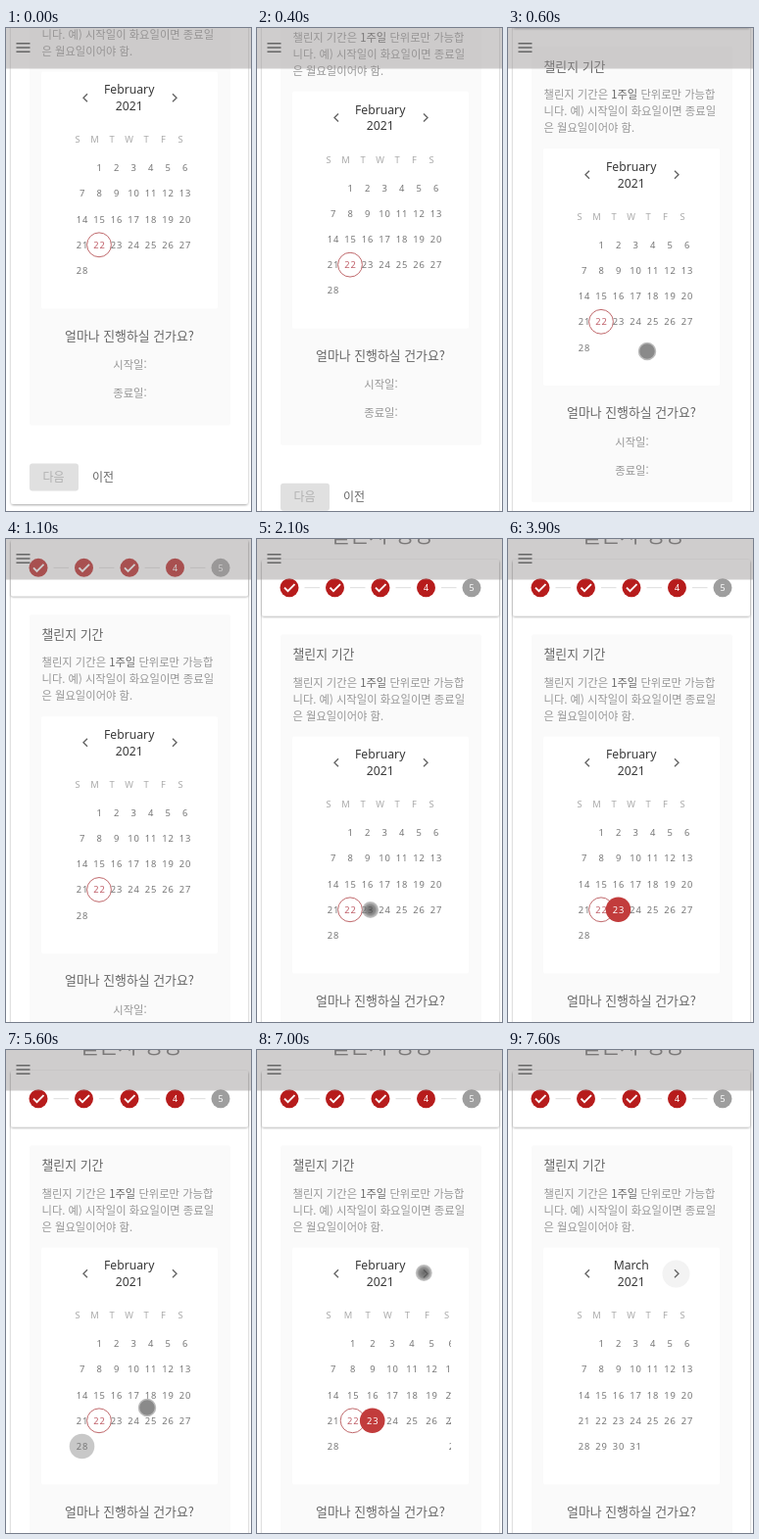
These frames come from a looping animation (250 px wide and 493 px high, 8 s). An HTML page:

```html
<!DOCTYPE html>
<html lang="ko">
<head>
<meta charset="utf-8">
<title>챌린지 기간</title>
<style>
  html, body { margin: 0; width: 100%; height: 100%; overflow: hidden; background: #fff; }
  svg { display: block; width: 100%; height: 100%; }
  text { font-family: "Noto Sans CJK KR", "Noto Sans CJK", "Noto Sans KR", sans-serif; fill: #979797; font-size: 11.3px; }
  .mid { text-anchor: middle; }
  .strong { font-weight: 500; fill: #666; }
  .month text { font: 12.2px "Noto Sans", "Open Sans", sans-serif; fill: #3a3a3a; }
  .day, .week { font: 9.4px "Noto Sans", "Open Sans", sans-serif; letter-spacing: .9px; fill: #777; }
  .week { fill: #aaa; letter-spacing: 0; }
  .step { font: 9px "Noto Sans", sans-serif; fill: #fff; }
  .line { fill: none; stroke: #666; stroke-width: 1.4; }
</style>
</head>
<body>
<svg viewBox="0 0 250 493">
  <defs>
    <filter id="shadow" x="-5%" y="-5%" width="110%" height="112%">
      <feDropShadow dx="0" dy="1" stdDeviation="1" flood-color="#000" flood-opacity=".35"/>
    </filter>
    <radialGradient id="press">
      <stop offset="0" stop-color="#444" stop-opacity=".8"/>
      <stop offset=".6" stop-color="#666" stop-opacity=".75"/>
      <stop offset="1" stop-color="#999" stop-opacity=".5"/>
    </radialGradient>
    <clipPath id="gridClip"><rect x="64" y="262" width="134" height="170"/></clipPath>
    <clipPath id="monthClip"><rect x="90" y="208" width="71" height="40"/></clipPath>
  </defs>

  <g id="page">
    <rect x="5" y="21.5" width="242" height="622" rx="3" fill="#fff" filter="url(#shadow)"/>
    <rect x="5" y="21.5" width="242" height="57.5" rx="2" fill="#fff" filter="url(#shadow)"/>
    <text class="mid strong" x="127" y="3.7" style="font-size:21.5px">챌린지 생성</text>
    <g id="steps"></g>

    <rect x="24" y="98" width="205" height="465" rx="2" fill="#fafafa"/>
    <text class="strong" x="36.5" y="122.5" style="font-size:12.9px">챌린지 기간</text>
    <text x="36.5" y="151.3">챌린지 기간은 <tspan class="strong">1주일</tspan> 단위로만 가능합</text>
    <text x="36.5" y="168.3">니다. 예) 시작일이 화요일이면 종료일</text>
    <text x="36.5" y="185.3">은 월요일이어야 함.</text>

    <rect x="36" y="202" width="180" height="242" rx="2" fill="#fff"/>
    <circle id="hover" cx="171.5" cy="229" r="14" fill="#f3f3f3"/>
    <path class="line" d="M83 224.7l-4 4 4 4M170 224.7l4 4-4 4"/>
    <g class="month" clip-path="url(#monthClip)">
      <g id="label0"><text class="mid" x="125.7" y="224.7">February</text><text class="mid" x="125.7" y="241.5">2021</text></g>
      <g id="label1"><text class="mid" x="125.7" y="224.7">March</text><text class="mid" x="125.7" y="241.5">2021</text></g>
    </g>
    <g clip-path="url(#gridClip)">
      <g id="week"></g>
      <g id="grid0"></g>
      <g id="grid1"></g>
    </g>

    <text class="mid strong" x="126" y="476.3" style="font-size:12.9px">얼마나 진행하실 건가요?</text>
    <text class="mid" x="126.5" y="505.5">시작일:</text>
    <text class="mid" x="126.5" y="534.5">종료일:</text>
    <rect x="24" y="602" width="50" height="28" rx="3" fill="#e0e0e0"/>
    <text class="mid" x="48.5" y="620.3" style="font-size:12px;fill:#b0b0b0">다음</text>
    <text class="mid" x="99" y="620.3" style="font-size:12px;fill:#666">이전</text>
  </g>

  <rect width="250" height="41.5" fill="#969191" fill-opacity=".45"/>
  <path class="line" d="M10.5 15.7h14M10.5 20h14M10.5 24.3h14"/>
  <circle id="dot" r="8.5" stroke="#bbb"/>
</svg>

<script>
const LOOP = 8000, TICK = 100;
const $ = id => document.getElementById(id);

function add(parent, tag, attrs, content = "") {
  const node = document.createElementNS("http://www.w3.org/2000/svg", tag);
  for (const key in attrs) node.setAttribute(key, attrs[key]);
  node.textContent = content;
  parent.append(node);
  return node;
}

// Stepper
for (let i = 0; i < 5; i++) {
  const x = 33 + i * 46.5;
  add($("steps"), "circle", { cx: x, cy: 50.2, r: 9.5, fill: i < 4 ? "#b71c1c" : "#9e9e9e" });
  if (i < 3) add($("steps"), "path", { d: `M${x - 5} 50.2l3.5 3.5 7-7`, class: "line", style: "stroke:#fff;stroke-width:1.9" });
  else add($("steps"), "text", { x, y: 53.5, class: "mid step" }, i + 1);
  if (i < 4) add($("steps"), "path", { d: `M${x + 15.5} 50.2h15.5`, class: "line", style: "stroke:#ddd;stroke-width:1" });
}

// Calendar cells are moved by column so the pitch can change while months slide
const cells = [];
function cell(parent, tag, column, left, attrs, content) {
  const node = add(parent, tag, attrs, content);
  cells.push({ node, column, left, key: tag === "circle" ? "cx" : "x" });
  return node;
}

[..."SMTWTFS"].forEach((name, i) => cell($("week"), "text", i, 73, { y: 274.7, class: "mid week" }, name));

const rowY = day => 300.2 + Math.floor(day / 7) * 26.2;
const disc = (day, attrs) => cell($("grid0"), "circle", day % 7, 77.5, { cy: rowY(day), r: 12.8, ...attrs });
const dayText = (grid, day) =>
  cell($(grid), "text", day % 7, 78.1, { y: rowY(day) + 3.5, class: "mid day" }, day);

const grey28 = disc(28, { fill: "#c8c8c8" });
const grey23 = disc(23, { fill: "#c8c8c8" });
const days = [];
for (let d = 1; d <= 28; d++) if (d !== 23) days[d] = dayText("grid0", d);
days[22].style.fill = "#c0606a";
disc(22, { r: 12.4, fill: "none", stroke: "#c0696c" });
const red23 = disc(23, { fill: "#c23c3c" });
days[23] = dayText("grid0", 23);
for (let d = 1; d <= 31; d++) dayText("grid1", d);

const touches = [
  { from: 600, to: 1000, x: 142, y: 330 },
  { from: 2100, to: 2300, x: 115.7, y: 378.5, pressed: true },
  { from: 3100, to: 3200, x: 78, y: 408 },
  { from: 5600, to: 5700, x: 144, y: 365 },
  { from: 7000, to: 7100, x: 170.3, y: 227.5, pressed: true },
];

const ramp = (t, from, to) => Math.min(1, Math.max(0, (t - from) / (to - from)));
const easeInOut = x => x * x * (3 - 2 * x);
const easeOut = x => 1 - (1 - x) ** 3;
const shift = (id, x) => $(id).setAttribute("transform", `translate(${x} 0)`);

function render(t) {
  const scroll = easeInOut(ramp(t, 300, 600)) + easeInOut(ramp(t, 900, 1200));
  $("page").setAttribute("transform", `translate(0 ${-157.5 + 78.5 * scroll})`);

  const firstReturn = ramp(t, 3400, 3900), leave = ramp(t, 4500, 4900), secondReturn = ramp(t, 5900, 6400);
  const selected = firstReturn - leave + secondReturn;
  grey23.setAttribute("opacity", ramp(t, 2400, 2800) - firstReturn);
  grey28.setAttribute("opacity", leave - secondReturn);
  red23.setAttribute("opacity", selected);
  days[23].style.fill = selected > .4 ? "#fff" : "";
  days[23].style.fontWeight = selected > .4 ? 500 : 400;

  const sliding = t >= 7000 && t < 7400;
  const pitch = sliding ? 20.1 : 17.5;
  for (const c of cells) c.node.setAttribute(c.key, c.left + c.column * pitch);
  const slide = easeOut(ramp(t, 7000, 7350));
  shift("grid0", -248 * slide);
  shift("grid1", 124 * (1 - slide));
  shift("label0", -142 * slide);
  shift("label1", 71 * (1 - slide));
  for (const id of ["grid1", "label1"]) $(id).style.display = t < 7000 ? "none" : "";
  $("hover").setAttribute("opacity", t >= 7100 ? 1 : 0);

  const touch = touches.find(p => t >= p.from && t < p.to);
  const dot = $("dot");
  dot.setAttribute("opacity", touch ? 1 : 0);
  if (touch) {
    dot.setAttribute("cx", touch.x);
    dot.setAttribute("cy", touch.y);
    dot.setAttribute("fill", touch.pressed ? "url(#press)" : "rgba(125,125,125,.9)");
    dot.setAttribute("stroke-width", touch.pressed ? 0 : 1.5);
  }
}

let shown = -1;
function frame() {
  const t = Math.floor(performance.now() % LOOP / TICK) * TICK;
  if (t !== shown) render(shown = t);
  requestAnimationFrame(frame);
}
frame();
</script>
</body>
</html>
```
